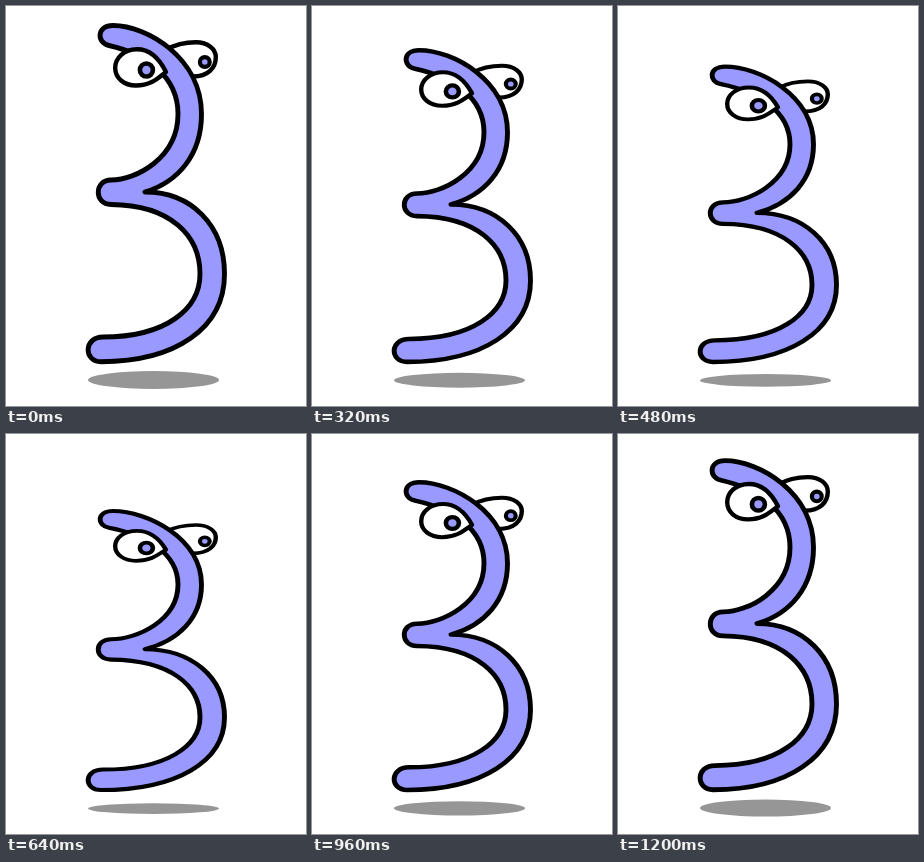
Write an HTML page that moves like this. It is 300 px wide and 400 px high and loops after 1.28 s.

```html
<!DOCTYPE html>
<html>
<head>
<meta charset="utf-8">
<style>
  html, body { margin: 0; width: 100%; height: 100%; overflow: hidden; background: #fff; }
  svg { display: block; width: 100%; height: 100%; }
</style>
</head>
<body>
<svg viewBox="0 0 300 400">
  <ellipse id="shadow" cx="147.5" rx="65.5" fill="#969696"/>
  <g id="figure" stroke="#000" stroke-width="4.9" stroke-linejoin="round" fill="#99f">
    <path d="M160 44C170 38 181 36.3 190 36.3C202 36.3 209.8 43 209.8 51
      C209.8 62 202 70.5 187 70.5Z" fill="#fff" stroke-width="4.4"/>
    <circle cx="198.8" cy="56" r="4.9" stroke-width="4.2"/>
    <path d="M107 19.5C141 19.5 195.5 52 195.5 108C195.5 149 172 176 139 186
      C185 186 218.5 219 218.5 268C218.5 322 170 355.7 95 355.7
      C77.5 355.7 77.5 331 97 331C160 331 194 303 194 268
      C194 230 165 199 105 198.5C88 198.5 88 174 105 174
      C130 174 172 152 172 108C172 70 140 48 103 39.5C90.5 37 90.5 19.5 107 19.5Z"/>
    <path d="M160 66C152 50 143 43.3 131 43.3C118 43.3 109.2 52 109.2 62
      C109.2 72 118 79.5 130 79.5C146 79.5 153 71 160 66Z" fill="#fff" stroke-width="4.4"/>
    <circle cx="140.4" cy="64" r="6.5" stroke-width="4.6"/>
  </g>
</svg>
<script>
  const STEP = 80, LOOP = 1280, FLOOR = 358;
  const figure = document.getElementById('figure');
  const shadow = document.getElementById('shadow');

  // Squash amount: short hold, down in 7 steps, back up in 8.
  const squashAt = n => n < 9 ? Math.max(0, n - 1) / 7 : (16 - n) / 8;

  function draw(now) {
    const k = squashAt(Math.floor(now % LOOP / STEP));
    const scale = 1 - 0.17 * k;
    figure.setAttribute('transform', `translate(0 ${FLOOR * (1 - scale)}) scale(1 ${scale})`);
    shadow.setAttribute('cy', 374 + 0.6 * k);
    shadow.setAttribute('ry', 9 - 3.7 * k);
  }

  let start;
  function tick(now) {
    start ??= now;
    draw(now - start);
    requestAnimationFrame(tick);
  }
  draw(0);
  requestAnimationFrame(tick);
</script>
</body>
</html>
```
